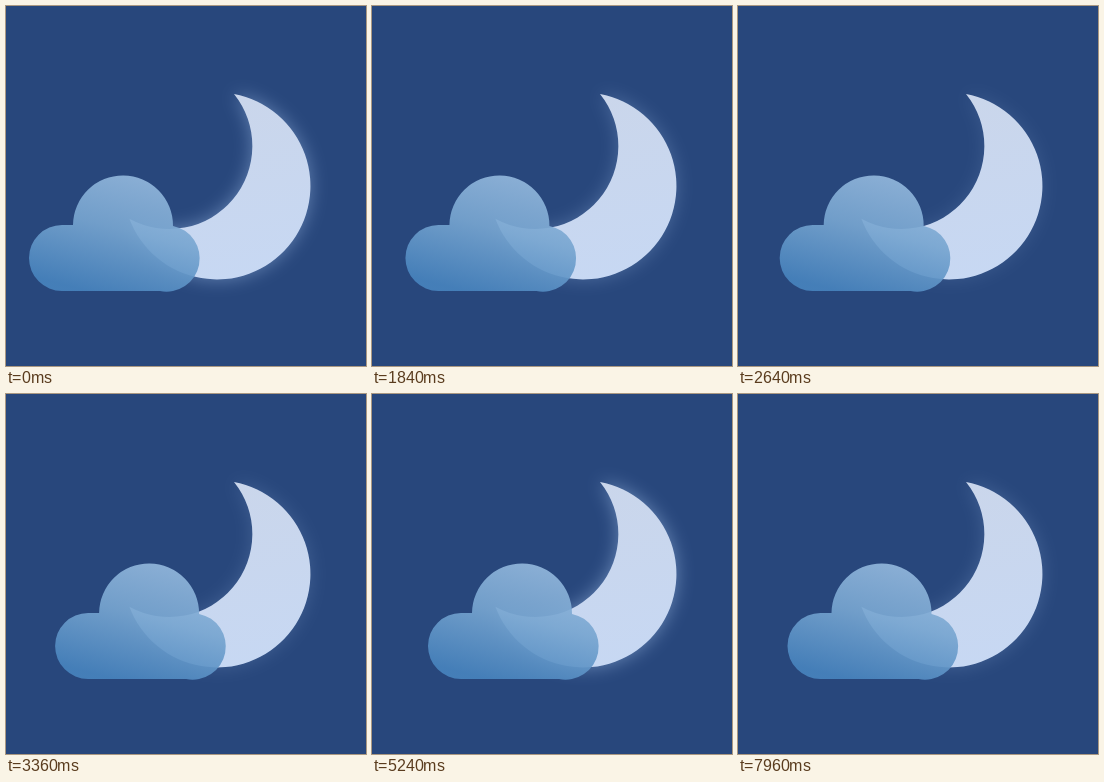
These frames come from a looping animation (360 px wide and 360 px high, 8000 ms). An HTML page:

```html
<!DOCTYPE html>
<html lang="en">
<head>
<meta charset="utf-8">
<title>Moon and cloud</title>
<style>
  html, body { margin: 0; width: 100%; height: 100%; overflow: hidden; background: #28477c; }
  svg { display: block; width: 100%; height: 100%; }
</style>
</head>
<body>
<svg viewBox="0 0 360 360">
  <defs>
    <linearGradient id="moonFill" gradientUnits="userSpaceOnUse" x1="220" y1="90" x2="250" y2="274">
      <stop offset="0" stop-color="#cad6eb"/>
      <stop offset="1" stop-color="#c7d8f3"/>
    </linearGradient>
    <linearGradient id="cloudFill" gradientUnits="userSpaceOnUse" x1="125" y1="169" x2="94" y2="288">
      <stop offset="0" stop-color="#92b7dc"/>
      <stop offset="0.45" stop-color="#77a5d0"/>
      <stop offset="1" stop-color="#4783bd"/>
    </linearGradient>
    <filter id="blur" filterUnits="userSpaceOnUse" x="60" y="30" width="300" height="300" color-interpolation-filters="sRGB">
      <feGaussianBlur stdDeviation="9"/>
    </filter>
    <path id="crescent" d="M228 88A93.5 93.5 0 1 1 123.4 212.8A83 83 0 0 0 228 88Z"/>
  </defs>
  <use id="glow" href="#crescent" fill="#a9c8f2" filter="url(#blur)"/>
  <use href="#crescent" fill="url(#moonFill)"/>
  <path id="cloud" fill="url(#cloudFill)" fill-opacity="0.92"
    d="M56 219H67A50 50 0 0 1 167 219.9A33 33 0 0 1 154 285H56A33 33 0 0 1 56 219Z"/>
</svg>
<script>
  const LOOP = 8000, TRAVEL = 33, MOVE = 3800, RAMP = 600;
  const cloud = document.getElementById('cloud');
  const glow = document.getElementById('glow');

  // Distance covered with a steady speed between two short ramps.
  function glide(ms) {
    const t = Math.min(Math.max(ms, 0), MOVE);
    const speed = TRAVEL / (MOVE - RAMP);
    if (t < RAMP) return speed * t * t / (2 * RAMP);
    if (t > MOVE - RAMP) return TRAVEL - speed * (MOVE - t) ** 2 / (2 * RAMP);
    return speed * (t - RAMP / 2);
  }

  function draw(now) {
    const t = now % LOOP;
    const x = glide(t - 530) - glide(t - 7030);
    const pulse = 0.5 + 0.5 * Math.cos((t - 550) / 4500 * 2 * Math.PI);
    cloud.setAttribute('transform', `translate(${x.toFixed(2)} 0)`);
    glow.setAttribute('opacity', (0.14 + 0.36 * pulse).toFixed(3));
    requestAnimationFrame(draw);
  }
  draw(0);
</script>
</body>
</html>
```
